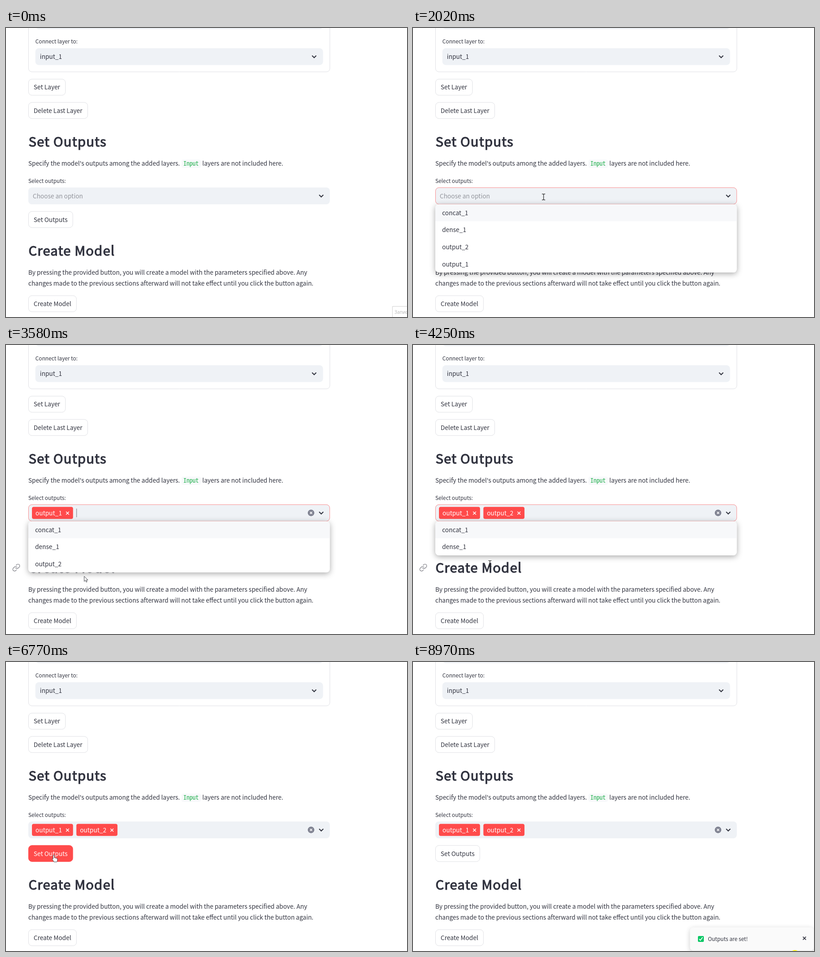
These frames come from a looping animation (881x636 px, 9060 ms). An HTML page with a canvas:

```html
<!DOCTYPE html>
<html lang="en">
<head>
<meta charset="utf-8">
<title>Set outputs</title>
<style>
html, body { margin: 0; width: 100%; height: 100%; overflow: hidden; background: #fff; }
canvas { display: block; width: 881px; height: 636px; }
</style>
</head>
<body>
<canvas id="stage"></canvas>
<script>
const W = 881, H = 636, LOOP = 9060;
const SANS = '"Noto Sans CJK JP", "Noto Sans CJK SC", "Noto Sans CJK KR", "Noto Sans", sans-serif';
const MONO = '"Noto Sans Mono CJK JP", "Noto Sans Mono CJK SC", "Noto Sans Mono", monospace';
const BODY = 13.49, SMALL = 11.78, TITLE = 29;
const INK = '#31333f', RED = '#ff4b4b', FIELD = '#eff2f6', LINE = '#e0e1e5';
const ROW = 37.6, LIST_TOP = 387.7;

// Event times in ms
const FOCUS = 1430, OPEN = 1545, PICK_1 = 3235, PICK_2 = 4175, CLOSE = 5165;
const PRESS = 6765, RELEASE = 6895, TOAST = 7095, BLUR = 8965;

// Pointer hot spot: time, x, y
const PATH = [
  [70, 834, 622], [940, 306, 364], [1010, 301, 363], [1400, 301, 363],
  [1480, 295, 363], [1880, 295, 363], [2750, 178, 490], [2890, 177, 488],
  [3100, 172, 512], [3500, 172, 514], [3790, 171, 487], [3980, 170, 481],
  [4250, 169, 481], [5040, 22, 399], [5230, 20, 395], [5780, 105, 425],
  [7540, 105, 425], [8430, 817, 607], [8500, 818, 609], [8640, 824, 640]
];

const canvas = document.getElementById('stage');
const ctx = canvas.getContext('2d');
const dpr = window.devicePixelRatio || 1;
canvas.width = W * dpr;
canvas.height = H * dpr;

const HAND = new Path2D('M-1.6 8.5V1.2Q-1.6-.3 0-.3T1.4 1.2V6q1.6-.8 2.5.5 1.6-.5 2.2.8 1.9-.2 1.9 1.6v2.3q0 2-1.5 3.8H.4Q-.7 13-2.4 10.6-4 8.6-3.3 8q.8-.7 1.7.5Z');
const ARROW = new Path2D('M0 0V11.3L2.7 8.9 4.5 13 6.4 12.1 4.6 8.2H8.2Z');
const BEAM = new Path2D('M-3.5-6.5H-1.2L0-5.7 1.2-6.5H3.5M0-5.7V5.7M-3.5 6.5H-1.2L0 5.7 1.2 6.5H3.5');
const LINK = new Path2D('M10 13a5 5 0 0 0 7.54.54l3-3a5 5 0 0 0-7.07-7.07l-1.72 1.71M14 11a5 5 0 0 0-7.54-.54l-3 3a5 5 0 0 0 7.07 7.07l1.71-1.71');

const clamp = v => Math.max(0, Math.min(1, v));
const within = (p, x, y, w, h) => p.x >= x && p.x < x + w && p.y >= y && p.y < y + h;

function text(str, x, y, size = BODY, color = INK, family = SANS) {
  ctx.font = `400 ${size}px ${family}`;
  ctx.fillStyle = color;
  ctx.fillText(str, x, y);
}

// Semibold look: regular glyphs with an outline and looser spacing
function title(str, y) {
  ctx.letterSpacing = '1.04px';
  text(str, 49.4, y, TITLE);
  ctx.strokeStyle = INK;
  ctx.lineWidth = 1.1;
  ctx.lineJoin = 'miter';
  ctx.miterLimit = 3;
  ctx.strokeText(str, 49.4, y);
  ctx.letterSpacing = '0px';
}

function box(x, y, w, h, r, fill, stroke) {
  ctx.beginPath();
  ctx.roundRect(x, y, w, h, r);
  if (fill) { ctx.fillStyle = fill; ctx.fill(); }
  if (stroke) { ctx.strokeStyle = stroke; ctx.lineWidth = 1; ctx.stroke(); }
}

function panel(x, y, w, h, fill, blur, alpha) {
  ctx.save();
  ctx.shadowColor = `rgba(0,0,0,${alpha})`;
  ctx.shadowBlur = blur * dpr;
  ctx.shadowOffsetY = 3 * dpr;
  box(x, y, w, h, 7.5, fill);
  ctx.restore();
}

function lines(points, color, width) {
  ctx.beginPath();
  points.forEach(([x, y], i) => i ? ctx.lineTo(x, y) : ctx.moveTo(x, y));
  ctx.strokeStyle = color;
  ctx.lineWidth = width;
  ctx.lineJoin = 'miter';
  ctx.stroke();
}

function cross(x, y, r, color, width) {
  lines([[x - r, y - r], [x + r, y + r]], color, width);
  lines([[x - r, y + r], [x + r, y - r]], color, width);
}

const chevron = (x, y) => lines([[x - 4.6, y - 2.2], [x, y + 2.3], [x + 4.6, y - 2.2]], INK, 2);

function button(label, y, w, state = '') {
  const lit = state !== '';
  const down = state === 'down';
  box(49.5, y + .5, w - 1, 35.5, 7.5, down ? RED : '#fff', lit ? RED : LINE);
  text(label, 60.8, y + 23.3, BODY, down ? '#fff' : lit ? RED : INK);
}

function tag(label, x) {
  box(x, 356.3, 90.3, 26.5, 4, RED);
  text(label, x + 7.8, 375, BODY, '#fff');
  cross(x + 78.2, 370, 3.3, '#fff', 1.5);
}

function pointerAt(t) {
  if (t < 65 || t > 8640) return null;
  let i = 0;
  while (i < PATH.length - 2 && t >= PATH[i + 1][0]) i++;
  const [t0, x0, y0] = PATH[i], [t1, x1, y1] = PATH[i + 1];
  const u = clamp((t - t0) / (t1 - t0)), k = u * u * (3 - 2 * u);
  return { x: x0 + (x1 - x0) * k, y: y0 + (y1 - y0) * k };
}

function optionsAt(t) {
  if (t < OPEN || t >= CLOSE) return [];
  const all = ['concat_1', 'dense_1', 'output_2', 'output_1'];
  return all.slice(0, t < PICK_1 ? 4 : t < PICK_2 ? 3 : 2);
}

function drawPage() {
  ctx.fillStyle = '#fff';
  ctx.fillRect(0, 0, W, H);

  box(49.5, -20, 662, 116.5, 7.5, null, LINE);
  box(64.5, -30, 632, 32.5, 7.5, FIELD);
  text('Connect layer to:', 64.5, 34, SMALL);
  box(64.5, 44.5, 632, 37, 7.5, FIELD);
  text('input_1', 74.5, 68.3);
  chevron(677, 63);

  button('Set Layer', 112, 82);
  button('Delete Last Layer', 163.3, 131);

  title('Set Outputs', 261.4);
  text("Specify the model's outputs among the added layers.", 49, 302.8);
  box(385.5, 289.5, 42.5, 18.5, 4, '#f8f9fb');
  text('Input', 389.8, 303.4, 13.4, '#21b04d', MONO);
  text('layers are not included here.', 431.3, 302.8);
  text('Select outputs:', 49, 341, SMALL);

  title('Create Model', 501.1);
  text('By pressing the provided button, you will create a model with the parameters specified above. Any', 49, 542.6);
  text('changes made to the previous sections afterward will not take effect until you click the button again.', 49, 567);
  button('Create Model', 588.5, 106.3);
}

function drawField(t) {
  box(49, 351, 662.5, 37, 7.5, FIELD);
  const glow = t < CLOSE ? clamp((t - FOCUS) / 190) : clamp(1 - (t - CLOSE) / 80);
  if (glow) {
    ctx.globalAlpha = glow * .6;
    box(49.5, 351.3, 661.7, 36.4, 7.5, null, RED);
    ctx.globalAlpha = 1;
  }
  const tags = t < PICK_1 ? 0 : t < PICK_2 ? 1 : 2;
  if (!tags) text('Choose an option', 58.8, 375, BODY, '#92949b');
  if (tags > 0) {
    tag('output_1', 57);
    box(663, 362.3, 14.4, 14.4, 7.2, '#7f8291');
    cross(670.2, 369.5, 2.5, '#fff', 1.5);
  }
  if (tags > 1) tag('output_2', 154.6);
  chevron(692.6, 369.5);

  if (t >= 1405 && t < CLOSE && (t - 1405) % 1000 < 500) {
    ctx.fillStyle = '#70727b';
    ctx.fillRect(57 + tags * 97.6, 360, 1, 19);
  }
}

function drawList(options, hovered) {
  if (!options.length) return;
  const h = options.length * ROW;
  panel(49, LIST_TOP, 662.5, h, '#fff', 13, .34);
  ctx.save();
  ctx.beginPath();
  ctx.roundRect(49, LIST_TOP, 662.5, h, 7.5);
  ctx.clip();
  ctx.fillStyle = hovered < 0 ? '#f7f8fa' : FIELD;
  ctx.fillRect(49, LIST_TOP + Math.max(0, hovered) * ROW, 662.5, ROW);
  ctx.restore();
  options.forEach((name, i) => text(name, 64, LIST_TOP + i * ROW + 24.1));
}

function drawToast(t) {
  if (t < TOAST) return;
  ctx.globalAlpha = clamp(.15 + (t - TOAST) / 290);
  panel(608.5, 584, 272, 51.3, '#fafafa', 12, .2);
  box(626, 603, 13, 13, 2, '#0bc765');
  lines([[628.8, 609.6], [631.4, 612.4], [636.3, 605.8]], '#fff', 1.7);
  text('Outputs are set!', 648, 614.2, SMALL);
  cross(860, 608, 3.4, INK, 1.6);
  ctx.globalAlpha = 1;
}

function drawLink() {
  ctx.save();
  ctx.translate(13.4, 480.8);
  ctx.scale(.76, .76);
  ctx.strokeStyle = '#85868d';
  ctx.lineWidth = 1.8;
  ctx.lineCap = 'round';
  ctx.stroke(LINK);
  ctx.restore();
}

function drawPointer(p, kind) {
  ctx.save();
  ctx.translate(p.x, p.y);
  ctx.lineJoin = 'round';
  if (kind === 'beam') {
    ctx.strokeStyle = '#222';
    ctx.lineWidth = 1.2;
    ctx.stroke(BEAM);
  } else {
    const shape = kind === 'hand' ? HAND : ARROW;
    ctx.fillStyle = '#fff';
    ctx.strokeStyle = '#44464d';
    ctx.lineWidth = 1;
    ctx.fill(shape);
    ctx.stroke(shape);
  }
  ctx.restore();
}

function draw(t) {
  ctx.setTransform(dpr, 0, 0, dpr, 0, 0);
  const p = pointerAt(t);
  const options = optionsAt(t);
  const inList = p && within(p, 49, LIST_TOP, 662.5, options.length * ROW);
  const hovered = inList ? Math.floor((p.y - LIST_TOP) / ROW) : -1;
  const onButton = p && !inList && within(p, 49, 403, 98, 36.5);
  const onHeading = p && !inList && within(p, 14, 470, 698, 46);
  const onText = p && (within(p, 49, 351, 662, 37) ||
    within(p, 49, 474, 189, 34) || within(p, 49, 528, 626, 44));

  drawPage();
  const pressed = t >= PRESS && t < RELEASE;
  const focused = t >= PRESS && t < BLUR;
  button('Set Outputs', 403.2, 98.3, pressed ? 'down' : onButton || focused ? 'lit' : '');
  if (onHeading) drawLink();
  drawField(t);
  drawList(options, hovered);
  drawToast(t);

  if (p) drawPointer(p, inList || onButton ? 'hand' : onText ? 'beam' : 'arrow');
  if (t < 65) {
    box(849, 612.7, 60, 40, 0, '#fff', '#cfcfcf');
    text('Запись', 853.5, 629, 10, '#b9b9b9', '"Noto Sans", sans-serif');
  }
  if (t >= BLUR) box(828, 634, 22, 22, 11, '#fff200');
}

let start;
function tick(now) {
  if (start === undefined) start = now;
  draw((now - start) % LOOP);
  requestAnimationFrame(tick);
}
requestAnimationFrame(tick);
</script>
</body>
</html>
```
